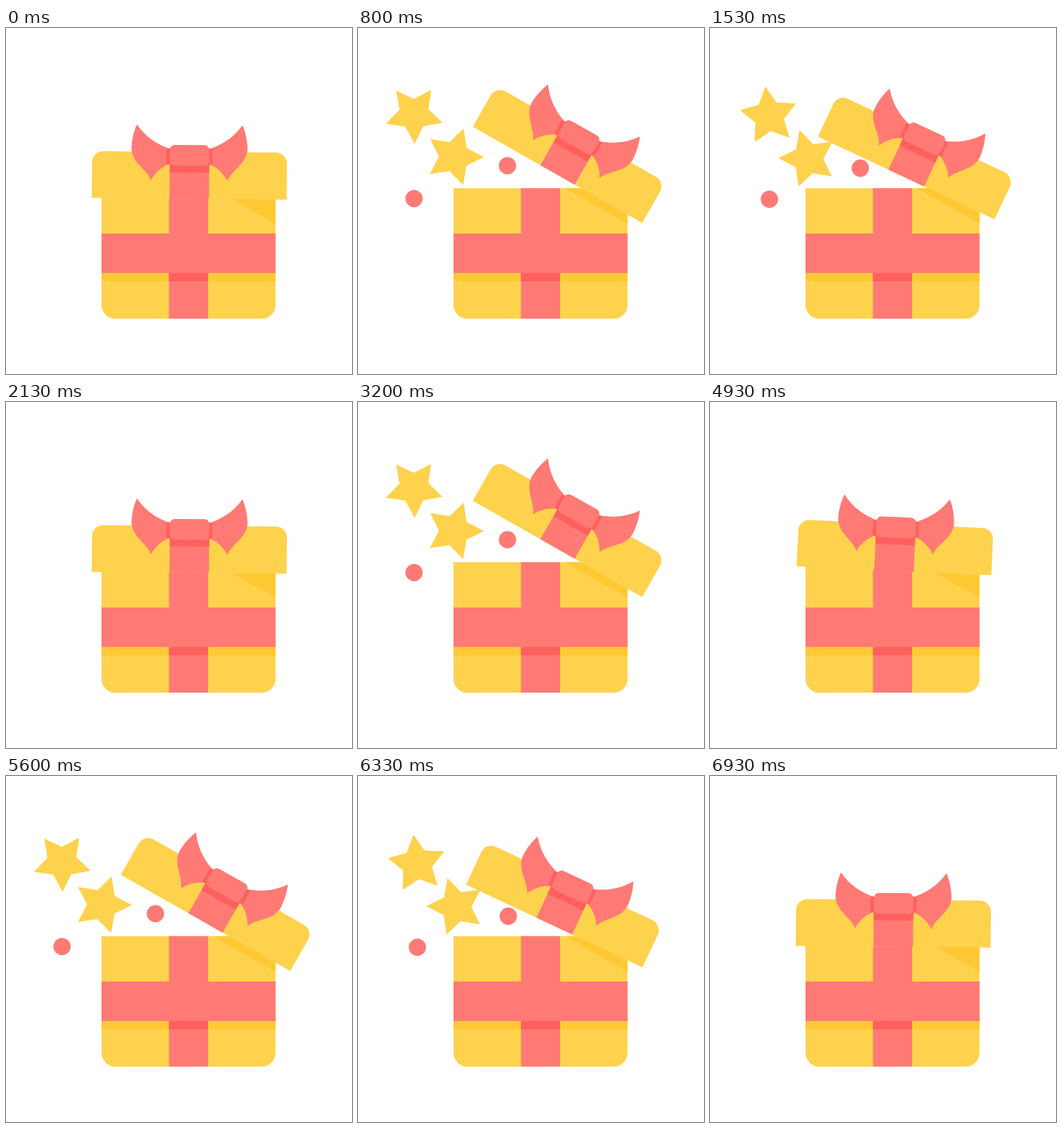
Recreate the animation shown at these times as an HTML page without scripts. Size 500 by 500 pixels, loop 7160 ms.

```html
<!DOCTYPE html>
<html lang="en">
<head>
<meta charset="utf-8">
<title>Gift box</title>
<style>
  html, body { margin: 0; height: 100%; overflow: hidden; background: #fff; }
  svg { display: block; width: 100vw; height: 100vh; }

  .yellow { fill: #ffd24d; }
  .amber { fill: #ffc933; }
  .pink { fill: #ff7a75; }
  .red { fill: #ff605e; }

  .lid, .bit {
    animation: 7160ms cubic-bezier(.33, 0, .67, 1) infinite;
  }
  .lid { transform-origin: 343px 275px; animation-name: lift; }
  .bit { animation-name: burst; }
  .spin { animation: spin 7160ms linear infinite; }

  /* Three open-and-close rounds of 2400 ms; the last rest is a little shorter. */
  @keyframes lift {
    0%, 29.795%, 33.52%, 63.315%, 67.039%, 96.834%, 100% { rotate: .5deg; }
    11.173%, 18.622%, 44.693%, 52.142%, 78.212%, 85.661% { rotate: 29.6deg; }
  }
  @keyframes burst {
    0%, 29.795%, 33.52%, 63.315%, 67.039%, 96.834%, 100% { translate: var(--home); }
    9.311%, 20.484%, 42.83%, 54.004%, 76.35%, 87.523% { translate: var(--out); }
  }
  /* The turn resets while the stars are hidden. */
  @keyframes spin {
    0%, 33.52%, 67.039%, 100% { rotate: var(--start); }
    29.795%, 63.315%, 96.834% { rotate: var(--end); }
  }
</style>
</head>
<body>
<svg viewBox="0 0 500 500">
  <defs>
    <path id="star" d="M43 0 17.8 12.9 13.3 40.9-6.8 20.9-34.8 25.3-22 0-34.8-25.3-6.8-20.9 13.3-40.9 17.8-12.9Z"/>
    <g id="wing">
      <path class="pink" d="M188 140.5C201 159 217 169 237 176V197C225 201 215 210 209 221.500C204 206 180 196 180.500 174C181 161 184 150 188 140.500Z"/>
      <rect class="red" x="231" y="175" width="9" height="23" rx="3"/>
    </g>
  </defs>

  <g class="bit" style="--home: 244px 222px; --out: 81px 124.500px">
    <use href="#star" class="yellow spin" style="--start: 142deg; --end: -191deg"/>
  </g>
  <g class="bit" style="--home: 248px 288px; --out: 139px 186px">
    <use href="#star" class="yellow spin" style="--start: -118.500deg; --end: 198.500deg"/>
  </g>
  <circle class="pink bit" r="12.5" style="--home: 264px 284px; --out: 81px 246.500px"/>
  <circle class="pink bit" r="12.5" style="--home: 259px 334px; --out: 216px 199px"/>

  <g class="box">
    <path class="yellow" d="M138 231.500H389.500V400A20 20 0 0 1 369.500 420H158A20 20 0 0 1 138 400Z"/>
    <path class="amber" d="M299 231.500H389.500V283ZM138 354H389.500V366H138Z"/>
    <path class="pink" d="M235.500 231.500H292V420H235.500Z"/>
    <path class="red" d="M235.500 354H292V366H235.500Z"/>
    <path class="pink" d="M138 297H389.500V354H138Z"/>
  </g>

  <g class="lid">
    <path class="yellow" d="M123.700 247.500V195.700A16 16 0 0 1 139.700 179.700H389.300A16 16 0 0 1 405.300 195.700V247.500Z"/>
    <path class="pink" d="M236 190H293V247.500H236Z"/>
    <path class="red" d="M236 196H293V209.500H236Z"/>
    <use href="#wing"/>
    <use href="#wing" transform="translate(528.6) scale(-1 1)"/>
    <rect class="pink" x="236" y="169.800" width="57" height="30" rx="7"/>
  </g>
</svg>
</body>
</html>
```
